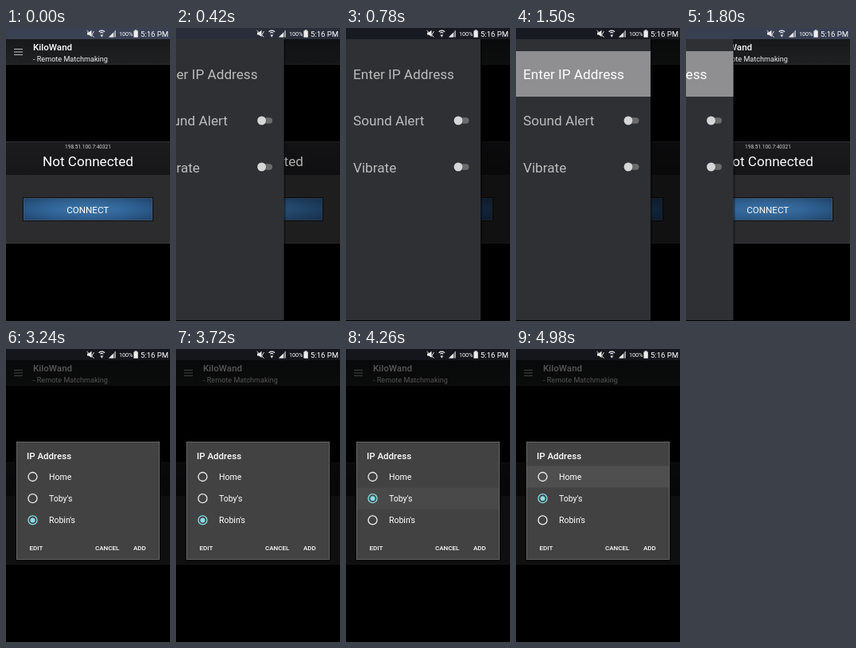
These frames come from a looping animation (206 by 367 pixels, 5.04 s). An HTML page with a canvas:

```html
<!DOCTYPE html>
<html lang="en">
<head>
<meta charset="utf-8">
<title>Remote Matchmaking</title>
<style>
html, body { margin: 0; width: 100%; height: 100%; overflow: hidden; background: #000; }
canvas { display: block; width: 206px; height: 367px; }
</style>
</head>
<body>
<canvas id="stage"></canvas>
<script>
const W = 206, H = 367, LOOP = 5040, STEP = 60;
const BAR = 14, DRAWER = 169;
const canvas = document.getElementById('stage');
const c = canvas.getContext('2d');
const dpr = window.devicePixelRatio || 1;
canvas.width = W * dpr;
canvas.height = H * dpr;

const clamp = v => Math.max(0, Math.min(1, v));
const ramp = (t, a, b) => clamp((t - a) / (b - a));
const easeOut = p => 1 - (1 - p) * (1 - p);
const smooth = p => p * p * (3 - 2 * p);

function rect(x, y, w, h, fill) {
  c.fillStyle = fill;
  c.fillRect(x, y, w, h);
}

function frame(x, y, w, h, color) {
  c.strokeStyle = color;
  c.lineWidth = 1;
  c.strokeRect(x + 0.5, y + 0.5, w - 1, h - 1);
}

function text(s, x, y, size, color, weight = 400, align = 'left') {
  c.font = `${weight} ${size}px Roboto, "Noto Sans", sans-serif`;
  c.textAlign = align;
  c.fillStyle = color;
  c.fillText(s, x, y);
}

function disc(x, y, r, fill) {
  c.fillStyle = fill;
  c.beginPath();
  c.arc(x, y, r, 0, 7);
  c.fill();
}

function poly(points, fill) {
  c.fillStyle = fill;
  c.beginPath();
  points.forEach(([x, y]) => c.lineTo(x, y));
  c.fill();
}

function line(x1, y1, x2, y2, color, width = 1) {
  c.strokeStyle = color;
  c.lineWidth = width;
  c.beginPath();
  c.moveTo(x1, y1);
  c.lineTo(x2, y2);
  c.stroke();
}

function gradient(x1, y1, x2, y2, ...colors) {
  const g = c.createLinearGradient(x1, y1, x2, y2);
  colors.forEach((col, i) => g.addColorStop(i / (colors.length - 1), col));
  return g;
}

function statusIcons() {
  const ink = '#ededed';
  // muted speaker
  poly([[102, 5.5], [104, 5.5], [107.5, 2.8], [107.5, 11], [104, 8.5], [102, 8.5]], ink);
  line(101.5, 3, 110.5, 11.5, ink);
  line(108, 8.5, 110.5, 4, ink, 0.9);
  // wifi with traffic arrow
  c.strokeStyle = ink;
  c.lineWidth = 1.2;
  for (const r of [2.4, 4.8]) {
    c.beginPath();
    c.arc(120.3, 8, r, -Math.PI * 0.78, -Math.PI * 0.22);
    c.stroke();
  }
  poly([[118.4, 8.6], [122.2, 8.6], [120.3, 11.6]], ink);
  // signal and battery
  poly([[129, 11.5], [137.5, 11.5], [137.5, 3]], 'rgba(237,237,237,.4)');
  poly([[129, 11.5], [134.8, 11.5], [134.8, 5.7]], ink);
  line(137.2, 3, 137.2, 11.5, ink, 0.8);
  text('100%', 142, 10.4, 7.2, '#fff');
  rect(161.7, 2.3, 2.8, 1.5, ink);
  rect(160.4, 3.5, 5.4, 8.2, ink);
  text('5:16 PM', 169, 11, 9.5, '#fff');
}

function button() {
  rect(21, 212, 164, 30, '#0b0f15');
  frame(22, 213, 162, 28, '#41566c');
  rect(23, 214, 160, 26, gradient(23, 0, 183, 0, '#27527f', '#34699c', '#3a72a6', '#34699c', '#27527f'));
  rect(23, 214, 160, 26, gradient(0, 214, 0, 240, 'rgba(10,25,50,.25)', 'rgba(60,120,180,.1)', 'rgba(10,25,50,.25)'));
  text('CONNECT', 102.7, 231.5, 11.6, '#fff', 400, 'center');
}

function home() {
  rect(0, 0, W, H, '#000');
  rect(0, 0, W, BAR, '#3a4153');
  rect(0, BAR, W, 32, gradient(0, BAR, 0, 46, '#18191b', '#1f2122'));
  rect(0, 45, W, 1, '#2a2b2d');
  for (const y of [26.5, 30, 33.5]) line(10, y, 21, y, '#b5b5b5', 1.1);
  text('KiloWand', 34, 28, 11.6, '#fff', 500);
  text('- Remote Matchmaking', 34, 42, 9.1, '#f0f0f0');
  rect(0, 142, W, 42, gradient(0, 142, 0, 184, '#1c1b1e', '#161618'));
  rect(0, 184, W, 86, '#2c2b2d');
  rect(0, 142, W, 1, '#2c2c2f');
  rect(0, 269, W, 1, '#3a3a3b');
  text('198.51.100.7:40321', 103, 151, 6.5, '#d0d0d0', 400, 'center');
  text('Not Connected', 103, 173, 17.1, '#fff', 400, 'center');
  button();
}

function toggle(y) {
  c.fillStyle = '#6c6c6c';
  c.beginPath();
  c.roundRect(138, y - 3.7, 16.5, 7.4, 3.7);
  c.fill();
  disc(141, y + 0.6, 6, 'rgba(0,0,0,.35)');
  disc(141, y, 5.5, '#d6d6d6');
}

function drawer(open, press) {
  rect(0, 0, W, H, `rgba(0,0,0,${0.6 * open ** 3})`);
  c.save();
  c.translate(DRAWER * (open - 1), 0);
  rect(DRAWER, BAR, 3, H, gradient(DRAWER, 0, DRAWER + 3, 0, 'rgba(0,0,0,.6)', 'rgba(0,0,0,0)'));
  rect(0, BAR, DRAWER, H - BAR - 1, '#2f3033');
  rect(0, 29, DRAWER, 57, `rgba(255,255,255,${0.46 * press})`);
  const ink = 188 + 67 * press;
  text('Enter IP Address', 9, 64, 17.2, `rgb(${ink},${ink},${ink})`);
  text('Sound Alert', 9, 122.3, 17.2, '#bcbcbc');
  text('Vibrate', 9, 180.6, 17.2, '#bcbcbc');
  toggle(116);
  toggle(174);
  c.restore();
}

function option(label, i, selected, press) {
  const y = 160 + 27.2 * i;
  const color = selected ? '#86dfe6' : '#f0f0f0';
  rect(13, y - 13.6, 180, 27.2, `rgba(255,255,255,${0.07 * press})`);
  c.strokeStyle = color;
  c.lineWidth = 1.3;
  c.beginPath();
  c.arc(33.5, y, 5.5, 0, 7);
  c.stroke();
  if (selected) disc(33.5, y, 3, color);
  text(label, 54, y + 3.8, 10.5, '#fff');
}

function dialog(t) {
  const show = smooth(ramp(t, 1920, 2130));
  const dim = ramp(t, 1920, 2300);
  rect(0, 0, W, H, `rgba(0,0,0,${0.66 * dim})`);
  c.save();
  c.globalAlpha = show;
  c.shadowColor = 'rgba(0,0,0,.8)';
  c.shadowBlur = 4 * dpr;
  rect(13, 116, 180, 148, '#424242');
  c.shadowColor = 'transparent';
  const pick = t < 4020 ? 2 : 1;
  const press = [
    ramp(t, 4740, 4920),
    ramp(t, 3840, 3960) * (1 - ramp(t, 4080, 4440)),
    0
  ];
  ['Home', "Toby's", "Robin's"].forEach((s, i) => option(s, i, i === pick, press[i]));
  frame(13, 116, 180, 148, '#626262');
  text('IP Address', 26, 138, 11.5, '#fff', 500);
  text('EDIT', 29.5, 251.5, 8, '#fff', 500);
  text('CANCEL', 112, 251.5, 8, '#fff', 500);
  text('ADD', 160, 251.5, 8, '#fff', 500);
  c.restore();
}

function draw(t) {
  c.setTransform(dpr, 0, 0, dpr, 0, 0);
  home();
  const open = easeOut(ramp(t, 180, 612)) * (1 - smooth(ramp(t, 1620, 1920)));
  if (open > 0) drawer(open, ramp(t, 1260, 1440));
  if (t > 1920) dialog(t);
  statusIcons();
}

const start = performance.now();
function tick() {
  const t = (performance.now() - start) % LOOP;
  draw(Math.floor(t / STEP) * STEP);
  requestAnimationFrame(tick);
}
tick();
</script>
</body>
</html>
```
